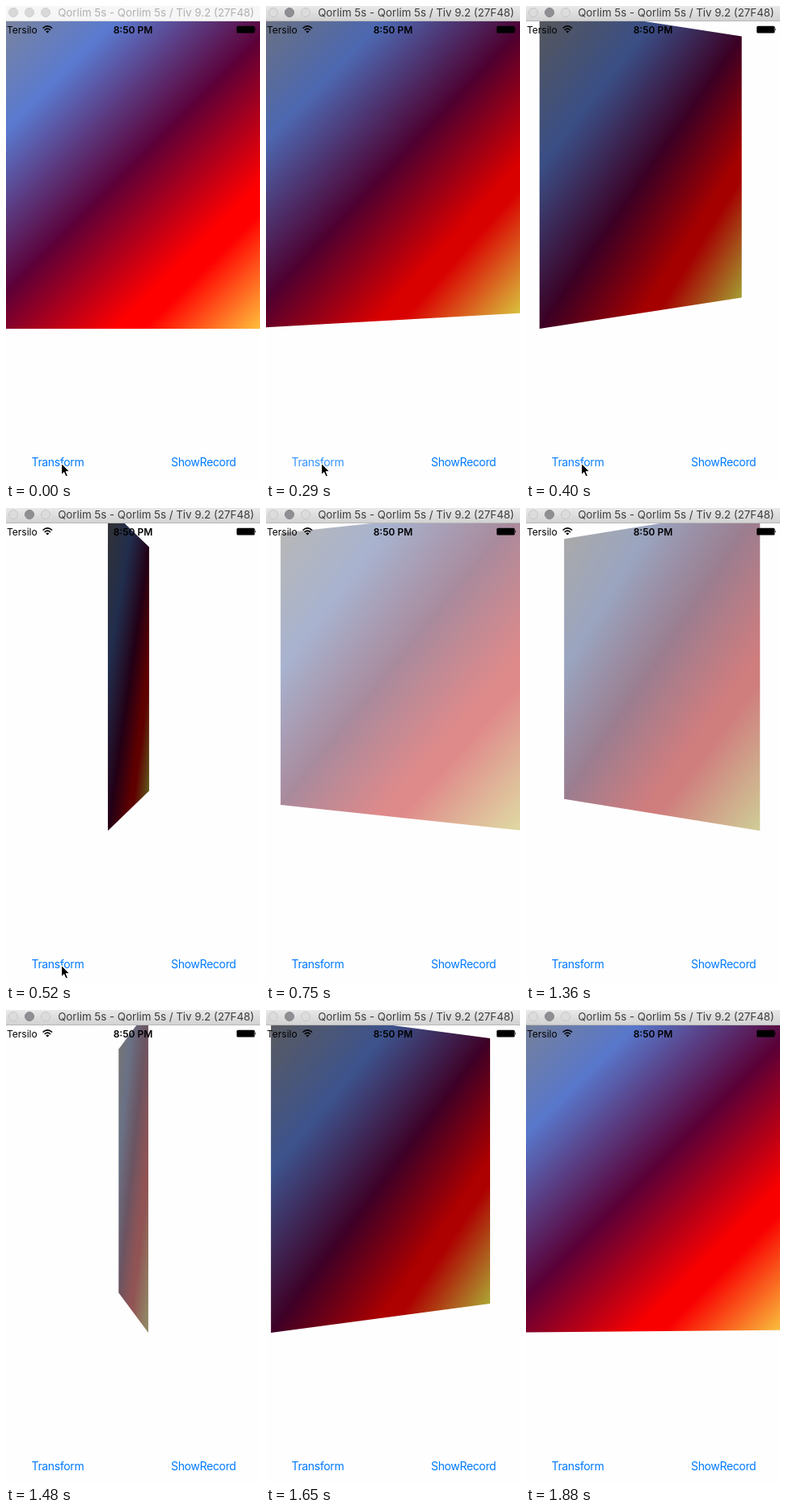
These frames come from a looping animation (314 px wide and 586 px high, 1980 ms). An HTML page:

```html
<!DOCTYPE html>
<html lang="en">
<head>
<meta charset="utf-8">
<title>Card flip</title>
<style>
  html, body { margin: 0; width: 100%; height: 100%; overflow: hidden; background: #fefefe; }
  #stage { position: relative; width: 314px; height: 586px; overflow: hidden; }
  #card {
    position: absolute; left: -45px; top: -1px; width: 400px; height: 400px;
    background: linear-gradient(135deg, #888, #5a7ad0 25%, #5c0038 50%, #f00 72.5%, #f00 77%, #fff64e);
  }
  svg { position: absolute; left: 0; top: 0; }
  text { font-family: Inter, "Liberation Sans", sans-serif; font-size: 12px; }
  .button { font-size: 14px; letter-spacing: -.35px; fill: #007aff; }
  #bar { fill: url(#chrome); }
  #bar text { font-size: 13.3px; fill: #3c3c3c; }
  #bar circle { fill: #dcdcdc; stroke: #c6c6c6; }
  #bar .middle { fill: #8e8e93; stroke: #85858a; }
  #bar.idle { fill: #f6f6f6; }
  #bar.idle text { fill: #b0b0b0; }
  #bar.idle circle { fill: #d8d8d8; stroke: #d0d0d0; }
</style>
</head>
<body>
<div id="stage">
  <div id="card"></div>
  <svg width="314" height="586">
    <linearGradient id="chrome" x2="0" y2="1">
      <stop stop-color="#e9e9e9"/><stop offset="1" stop-color="#d1d1d1"/>
    </linearGradient>
    <g id="bar">
      <rect width="314" height="19"/>
      <path d="M0 18.5H314" stroke="#000" stroke-opacity=".12"/>
      <circle cx="9" cy="8" r="5.5"/>
      <circle class="middle" cx="29" cy="8" r="5.5"/>
      <circle cx="49" cy="8" r="5.5"/>
      <text x="185.5" y="13" text-anchor="middle">Qorlim 5s - Qorlim 5s / Tiv 9.2 (27F48)</text>
    </g>
    <text x="1" y="33.5">Tersilo</text>
    <g fill="none" stroke="#000" stroke-width="1.6">
      <path d="M45.5 27.5Q51.3 22.4 57.1 27.5M47.7 29.8Q51.3 26.6 54.9 29.8"/>
      <path d="M49.3 31.4Q51.3 29.8 53.3 31.4L51.3 33.5Z" fill="#000" stroke="none"/>
    </g>
    <text x="157" y="33.5" text-anchor="middle" font-weight="600">8:50 PM</text>
    <rect x="285.2" y="24.7" width="22.3" height="8.8" rx="1.5"/>
    <path d="M308.3 27.3Q310 29 308.3 30.7Z"/>
    <text id="press" class="button" x="31.5" y="569">Transform</text>
    <text class="button" x="204" y="569">ShowRecord</text>
    <path id="cursor" d="M68.5 565.5V579.5L71.7 576.5L74 581.7L76.4 580.7L74.1 575.6H78.4Z" stroke="#fff"/>
  </svg>
</div>
<script>
const $ = id => document.getElementById(id);
const LOOP = 1980, STEP = 57, DEPTH = 1212, HALF = 200;

// [step, phase]: phase 0..1 flips over, 1..2 flips back
const KEYS = [[1, 0], [5, .229], [9, .473], [13, .693], [24, 1.357], [29, 1.666], [33, 1.904]];

function phaseAt(n) {
  if (n <= 1) return 0;
  const i = KEYS.findIndex(k => k[0] >= n);
  const [n0, p0] = KEYS[i - 1], [n1, p1] = KEYS[i];
  return p0 + (p1 - p0) * (n - n0) / (n1 - n0);
}

// cubic-bezier(.42, 0, .58, 1)
function ease(x) {
  let lo = 0, hi = 1, u = .5;
  for (let i = 0; i < 24; i++) {
    u = (lo + hi) / 2;
    const v = 1 - u;
    if (1.26 * u * v * v + 1.74 * u * u * v + u ** 3 < x) lo = u; else hi = u;
  }
  return u * u * (3 - 2 * u);
}

function draw(time) {
  const n = Math.min(33, Math.floor((time + 10) / STEP));
  const phase = phaseAt(n);
  const turn = 180 * (phase < 1 ? ease(phase) : 1 - ease(phase - 1));
  const back = turn > 90;
  const angle = back ? turn - 180 : turn;
  const tilt = Math.abs(angle);

  // Push the card back so that its near edge stays in the screen plane
  const z = -HALF * Math.sin(tilt * Math.PI / 180);
  const style = $("card").style;
  style.transform = `perspective(${DEPTH}px) translateZ(${z}px) rotateY(${angle}deg)`;
  style.filter = `brightness(${1 - .0077 * tilt})`;
  style.opacity = back ? .3 + .4 * tilt / 90 : 1;

  $("bar").setAttribute("class", n ? "" : "idle");
  $("press").style.opacity = n ? Math.min(1, .4 + .08 * n) : 1;
  $("cursor").style.display = n < 12 ? "" : "none";
}

const start = performance.now();
function tick() {
  draw((performance.now() - start) % LOOP);
  requestAnimationFrame(tick);
}
tick();
</script>
</body>
</html>
```
